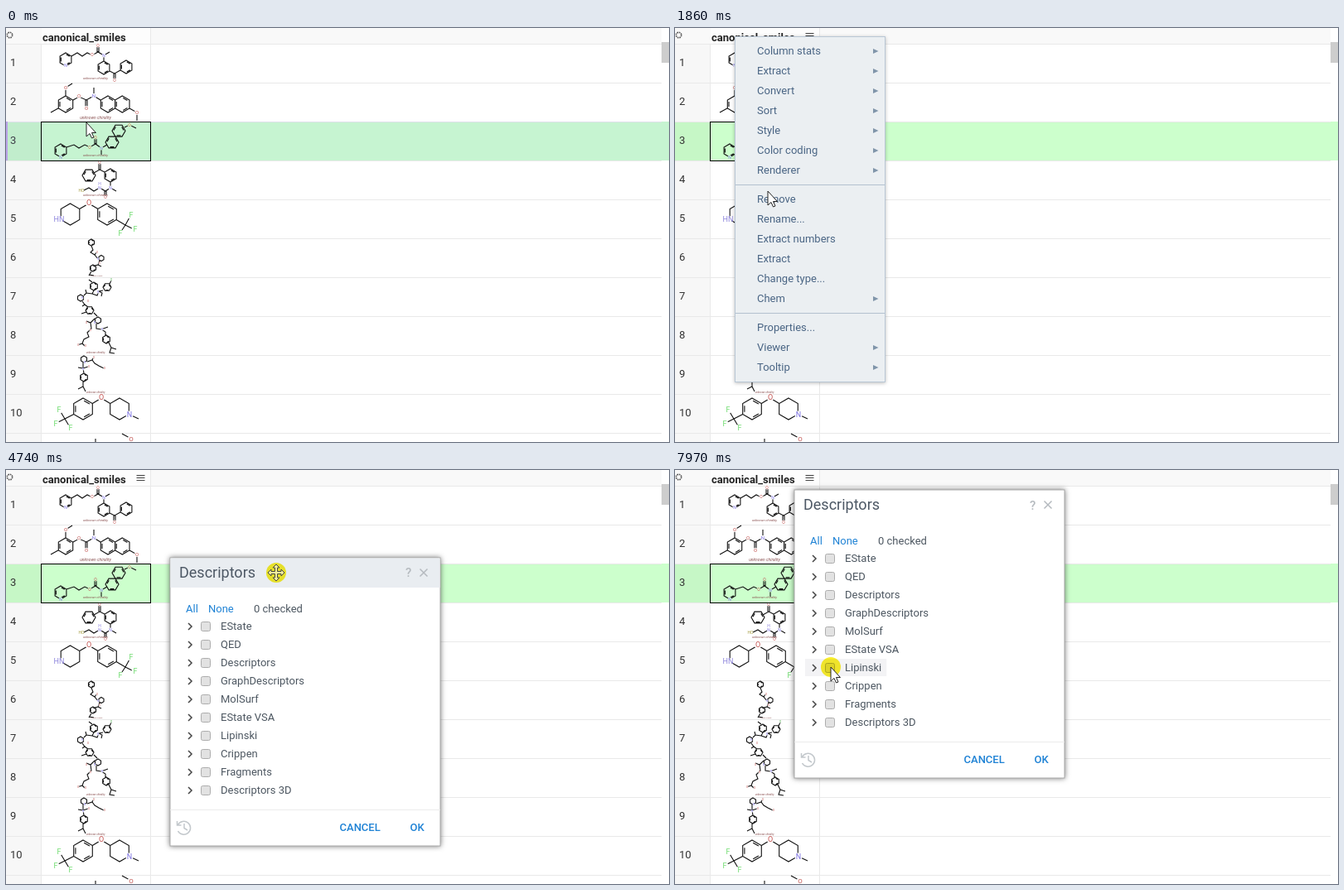
An HTML page for the animation above (8000 ms loop, 800x500 px).

```html
<!DOCTYPE html>
<html lang="en">
<head>
<meta charset="utf-8">
<title>Descriptors</title>
<style>
html, body { margin: 0; width: 100%; height: 100%; overflow: hidden; background: #fff; }
svg { display: block; width: 800px; height: 500px; font: 13px Roboto, sans-serif; }
text { white-space: pre; }
.mono { font: 11px "Noto Sans Mono", monospace; }
.menu { fill: #4a6584; }
.shade { filter: drop-shadow(0 1px 2px #0004); }
</style>
</head>
<body>
<svg id="stage" viewBox="0 0 800 500"></svg>
<script>
const LOOP = 8000;
const range = n => [...Array(n).keys()];
const text = (x, y, s, attr = '') =>
  `<text x="${x}" y="${y}" ${attr}>${s.replace(/&/g, '&amp;').replace(/</g, '&lt;')}</text>`;
const rect = (x, y, w, h, fill, attr = '') =>
  `<rect x="${x}" y="${y}" width="${w}" height="${h}" fill="${fill}" ${attr}/>`;
const path = (d, stroke, width = 1, attr = '') =>
  `<path d="${d}" fill="none" stroke="${stroke}" stroke-width="${width}" ${attr}/>`;
const group = (id, body, attr = '') => `<g id="${id}" ${attr}>${body}</g>`;

// ---- molecules ----
const ATOM = { O: '#c0504d', N: '#7a6fe0', HN: '#8f86dd', H: '#8f86dd', F: '#6fdc6f', Cl: '#4fb04f', HO: '#a39a3c' };

function ring([x, y, r, aromatic = 1, turn = 0]) {
  const at = (k, s) => {
    const a = (turn - 90 + 60 * k) * Math.PI / 180;
    return `${(x + s * Math.cos(a)).toFixed(1)} ${(y + s * Math.sin(a)).toFixed(1)}`;
  };
  let d = 'M' + range(6).map(k => at(k, r)).join('L') + 'Z';
  if (aromatic) for (const k of [0, 2, 4]) d += `M${at(k + .12, r * .76)}L${at(k + .88, r * .76)}`;
  return d;
}

function molecule(rings, bonds, atoms, size = 5, note) {
  const marks = atoms.map(([s, x, y]) =>
    `<circle cx="${x}" cy="${y}" r="${size * .5}" fill="${y > 113 && y < 160 ? '#ccffcc' : '#fff'}"/>` +
    text(x, y + size * .36, s, `font-size="${size}" text-anchor="middle" fill="${ATOM[s]}"`)).join('');
  const label = note ? text(note[0], note[1], 'unknown chirality',
    `font-size="${note[2]}" font-style="italic" text-anchor="middle" fill="#8a5050"`) : '';
  return path(rings.map(ring).join('') + bonds, '#111', 1.1) + marks + label;
}

const molecules = [
  molecule([[72, 38, 8], [118, 48, 8], [145, 47, 8]],
    'M79 34L86 30L92 34L98 30L104 33L111 29L118 33L125 29M110 29V22M112 29V22M118 33V40M125 52L131 55L138 51M130 55V63M132 55V63',
    [['N', 72, 45], ['O', 104, 32], ['O', 111, 21], ['N', 118, 33], ['O', 131, 63]], 5, [108, 62, 4]),
  molecule([[72, 92, 10], [123, 92, 10], [140.3, 92, 10]],
    'M72 82V72L80 67M63 97L54 102M81 87L88 83L97 87L106 82L114 87M96 87V96M98 87V96M106 82V72M149 97L158 102V112',
    [['O', 72, 72], ['O', 88, 82], ['O', 97, 97], ['N', 106, 82], ['O', 158, 102]], 6, [108, 110, 5]),
  molecule([[66, 148, 8], [128, 138, 8, 1, 30], [136, 124.2, 8, 1, 30]],
    'M73 144L82 141L88 145L95 141L101 144L108 140L115 145L122 141M107 140V133M109 140V133M115 145V153M143 120L149 117L157 121',
    [['N', 66, 156], ['O', 101, 144], ['O', 108, 132], ['N', 115, 145], ['O', 149, 117]], 5, [108, 155, 4]),
  molecule([[100, 178, 8, 1, 30], [126, 178, 8]],
    'M106 175L113 171L119 174M112 171V163M114 171V163M126 186V193L133 197M126 193L120 197L113 193L106 197L100 193L94 196M119 197V204M121 197V204',
    [['O', 113, 162], ['N', 126, 193], ['N', 113, 193], ['H', 113, 188], ['O', 120, 204], ['HO', 91, 196]], 5, [108, 203, 4]),
  molecule([[77.5, 225, 13, 0], [122, 225, 13]],
    'M88.7 218.5L100 212L111 218.5M133 231.5L144 238L150 227M144 238L154 243M144 238L138 247',
    [['HN', 64, 231], ['O', 100, 211], ['F', 151, 226], ['F', 156, 243], ['F', 138, 248]], 9),
  molecule([[103, 259, 4], [115, 278, 3.5, 0], [105, 290, 4]],
    'M103 263L105 268L102 271L107 274L111 279M107 274L109 271M113 281L111 286L107 287M111 286L115 288M103 294L100 299M101 298L106 299',
    [['O', 110, 271], ['N', 111, 279], ['O', 113, 284]], 3, [109, 300, 2]),
  molecule([[122, 313, 5, 1, 30], [106, 312, 5], [90, 326, 4, 0], [101, 341, 5, 1, 30]],
    'M117 317L112 318L110 323L104 321L106 317M112 318L116 320L115 324M104 321L97 320L94 323M97 320L96 316M92 330L95 334L99 337M95 334L92 336M97 343L91 345M106 344L110 348M104 307L100 304M125 309L127 305',
    [['Cl', 127, 304], ['N', 111, 319], ['N', 92, 326], ['O', 99, 330]], 3),
  molecule([[111, 353, 4, 0], [121, 376, 5]],
    'M107 351L102 356L97 354M102 356L103 363L98 368L100 373L94 376L92 381L86 383M92 381L95 384M109 357L109 363L115 364L120 367M115 364L123 361M120 367V371M124 380L127 386L133 388M127 386L125 392L131 393',
    [['N', 107, 356], ['O', 97, 356], ['O', 102, 365], ['N', 116, 364], ['O', 87, 383], ['O', 96, 384]], 3, [108, 393, 3]),
  molecule([[94, 400, 4, 0], [94, 422, 5]],
    'M98 403L104 401L107 405L112 408L118 411M104 401L106 397M93 404L93 411L87 410M93 411L99 409M93 411L94 417M93 427L93 433L87 436M93 433L96 439',
    [['O', 106, 398], ['N', 95, 404], ['N', 93, 412], ['O', 100, 409], ['O', 119, 411]], 3, [108, 441, 3]),
  molecule([[93, 460, 13], [137, 460, 13, 0]],
    'M81.7 466.5L71 472L65 462M71 472L61 477M71 472L77 482M104.3 453.5L115 447L125.7 453.5M148.3 466.5L160 472',
    [['F', 64, 461], ['F', 60, 478], ['F', 78, 483], ['O', 115, 446], ['N', 149, 467]], 9),
  molecule([], 'M108 496V500M140 490L151 496', [['O', 151, 496]], 8)
].join('');

// ---- grid ----
function grid() {
  const rows = range(11).map(k => 19.5 + 47 * k);
  return rect(0, 0, 791, 19, '#f9f9f9') + rect(43, 0, 131, 19, '#fdfdfd') + rect(0, 20, 42, 480, '#f7f7f7') +
    rect(0, 113, 800, 47, '#ccffcc') + rect(0, 113, 42, 47, '#000', 'opacity=".03"') +
    path(rows.map(y => `M0 ${y}H791`).join('') + 'M42.5 20V500M174.5 0V500', '#e9e9e9') +
    rect(791, 17, 9, 25, '#cdcdcd') +
    `<circle cx="4.5" cy="8.5" r="3.2" fill="none" stroke="#555" stroke-width="1.6" stroke-dasharray="1.6 .9"/>` +
    range(10).map(k => text(5, 46 + 47 * k, `${k + 1}`, 'fill="#333"')).join('') +
    text(44, 16, 'canonical_smiles', 'font-weight="700" fill="#222"') +
    group('hover', rect(0, 0, 800, 47, '#9696ff', 'opacity=".1"') + rect(0, 0, 2, 47, '#b9a2e8')) +
    molecules + rect(42.5, 113.5, 132, 47, 'none', 'stroke="#000"') +
    group('burger', path('M157.5 6.5h10m-10 3h10m-10 3h10', '#444'));
}

// ---- tooltip ----
const smiles = [
  'COC(=O)[C@]1(C)CCC[C@@]2(C)[C@H]1CC(=O)c3cc(c(NCCN...',
  'Br.Clc1ccccc1N2CCN(CC2)C(=O)C3CCCN(Cc4ccc(Br)cc4)C...',
  'Br.Clc1ccccc1N2CCN(CC2)C(=O)C3CCCN(Cc4ccc(CN5CCCC(...',
  'Br.[O-][N+](=O)c1ccc(CN2CCCC(C2)C(=O)N3CCN(CC3)c4c...',
  'BrC1=C(OCC(=O)NCc2ccccc2)C(=O)OC1c3ccccc3',
  'Brc1cc(Br)c2N=C(N(C(=O)c2c1)c3nc4ccccc4s3)c5ccccc5',
  'Brc1ccc(NC(=O)Nc2nc3c(ccc4ccccc34)s2)cc1',
  'Brc1ccc(NC(=S)Nc2nc3c(ccc4ccccc34)s2)cc1',
  'Brc1ccc(Oc2ccc(\\C=N\\NC(=O)CSc3nc4ccccc4s3)cc2)cc1',
  'Brc1ccc(Oc2ccc(\\C=N\\Nc3nc4ccccc4s3)cc2)cc1'
];

function tooltip() {
  const cell = (x, y, s, fill) => text(x, y, s, `class="mono" text-anchor="end" fill="${fill}"`);
  const small = (y, s, attr = '') => text(99, y, s, `font-size="11.7" fill="#4d4d4d" ${attr}`);
  return rect(89.5, 28.5, 509, 299, '#fbfde1', 'stroke="#e2e4bd" class="shade"') +
    small(50, 'canonical_smiles', 'font-weight="700"') + small(78, '1000 categories') +
    smiles.map((s, k) => {
      const y = 93 + 15 * k;
      return cell(454, y, s, '#222') + cell(499, y, '1', '#222') +
        rect(502, y - 8, 44, 9, '#add8e6') + cell(587.5, y, '0.1%', '#666');
    }).join('') +
    cell(454, 243, '(990 others)', '#4169d8') + cell(499, 243, '990', '#222') + cell(553.5, 243, '99.0%', '#666') +
    small(274, 'quality: Molecule') + small(302, 'cell.renderer: Molecule');
}

// ---- context menu ----
const panel = (x, y, w, h) => rect(x, y, w, h, '#ebeff2', 'stroke="#b9c7d5" class="shade"');

function menu() {
  const blocks = [
    [28, ['Column stats>', 'Extract>', 'Convert>', 'Sort>', 'Style>', 'Color coding>', 'Renderer>']],
    [207, ['Remove', 'Rename...', 'Extract numbers', 'Extract', 'Change type...', 'Chem>']],
    [362, ['Properties...', 'Viewer>', 'Tooltip>']]
  ];
  const items = blocks.flatMap(([top, names]) => names.map((name, k) => {
    const y = top + 24 * k;
    return text(99, y + 4, name.replace('>', ''), 'class="menu"') +
      (name.endsWith('>') ? `<path d="M239 ${y - 3}l6.5 3l-6.5 3z" fill="#8095aa"/>` : '');
  })).join('');
  return panel(72.5, 10.5, 181, 417) + group('chemRow', rect(73, 315, 180, 24, '#d6dee6')) +
    path('M73 189.5H253M73 344.5H253', '#b3c1cf') + items;
}

function submenu() {
  const names = ['Substructure Search...', 'Descriptors...', 'Descriptors (fast)...', 'Find MCS',
    'Get R Groups...', 'Fingerprints...', 'To InChI', 'To InChI Key', 'Map Identifiers...'];
  return panel(252.5, 275.5, 210, 240) + group('descRow', rect(253, 305, 209, 24, '#d6dee6')) +
    names.map((s, k) => text(279, 297 + 24 * k, 'Chem | ' + s, 'class="menu"')).join('');
}

// ---- dialog, drawn relative to its top left corner ----
const groups = ['EState', 'QED', 'Descriptors', 'GraphDescriptors', 'MolSurf', 'EState VSA',
  'Lipinski', 'Crippen', 'Fragments', 'Descriptors 3D'];
const lipinski = ['FractionCSP3', 'HeavyAtomCount', 'NHOHCount', 'NOCount', 'NumAliphaticCarbocycles',
  'NumAliphaticHeterocycles', 'NumAliphaticRings', 'NumAromaticCarbocycles', 'NumAromaticHeterocycles',
  'NumAromaticRings', 'NumHAcceptors', 'NumHDonors'];

function treeRow(x, y, name, arrow) {
  const d = arrow === 'down' ? `M${x - 17} ${y - 2}l4 4l4 -4` : `M${x - 15} ${y - 4}l4 4l-4 4`;
  return (arrow ? path(d, '#444', 1.5) : '') +
    rect(x + .5, y - 5.5, 11, 11, '#e2e2e2', 'rx="2" stroke="#adadad"') +
    text(x + 24, y + 4, name, 'fill="#4d5761"');
}

function tree(open) {
  const names = open ? groups.slice(0, 7) : groups;
  let out = names.map((s, k) => treeRow(37, 83 + 22 * k, s, open && k === 6 ? 'down' : 'right')).join('');
  if (open) return out + lipinski.map((s, k) => treeRow(55, 237 + 22 * k, s)).join('');
  const blue = 'font-weight="500" fill="#2083d5"';
  return out + path('M0 304.5H326', '#ececec') + text(204.5, 330, 'CANCEL', blue) + text(289.5, 330, 'OK', blue) +
    path('M9.5 322.5A8 8 0 1 1 9.5 330M8.5 318v5h5M17 321v5.500l4 2.500', '#c3c8cc', 1.5);
}

function dialog() {
  const frame = h => rect(0, 0, 326, h, '#fff', 'stroke="#a9a9a9" style="filter:drop-shadow(0 0 3px #0008)"');
  return group('frame', frame(348)) + group('tallFrame', frame(520)) +
    group('titleBar', rect(.5, .5, 325, 35.500, '#e9edf1')) +
    text(11, 24, 'Descriptors', 'font-size="18" fill="#4d5865"') +
    text(284, 23.5, '?', 'font-size="15" font-weight="500" fill="#b5babf"') +
    path('M301.500 13.500l9 9m0 -9l-9 9', '#b5babf', 1.5) +
    text(19, 66, 'All', 'fill="#2083d5"') + text(46, 66, 'None', 'fill="#2083d5"') +
    text(101, 66, '0 checked', 'fill="#4d5761"') +
    rect(13, 0, 98, 21, '#f3f3f5', 'id="rowHover"') +
    group('closedTree', tree(false)) + group('openTree', tree(true));
}

const stage = document.getElementById('stage');
stage.innerHTML = grid() + group('tooltip', tooltip()) + group('menu', menu()) + group('submenu', submenu()) +
  group('dialog', dialog()) +
  group('click', '<circle r="12" fill="#fbf02c"/>', 'style="mix-blend-mode:multiply"') +
  group('arrow', '<path d="M0 0V17L4 13.500L6.500 19L9 18L6.500 12.500H11.500Z" fill="#fff" stroke="#222"/>') +
  group('mover', '<path d="M0-10L4-6H1.500V-1.500H6V-4L10 0L6 4V1.500H1.500V6H4L0 10L-4 6H-1.500V1.500H-6V4L-10 0L-6-4V-1.500H-1.500V-6H-4Z" fill="#fff8" stroke="#444"/>');

const $ = id => document.getElementById(id);
const show = (id, on) => { $(id).style.display = on ? '' : 'none'; };
const move = (id, x, y) => $(id).setAttribute('transform', `translate(${x} ${y})`);
const rowWidths = groups.map(s => {
  const label = [...$('closedTree').querySelectorAll('text')].find(e => e.textContent === s);
  return label.getComputedTextLength() + 54;
});

// ---- timeline ----
const track = [[150, 97, 114], [800, 80, 11], [1560, 80, 11], [1860, 112, 197], [2320, 127, 333], [2880, 127, 333],
  [2960, 245, 326], [3420, 330, 319], [4030, 330, 319], [4570, 326, 124], [4740, 326, 124], [5190, 272, 42],
  [5370, 272, 42], [6030, 192, 245], [6180, 192, 245], [6410, 167, 238], [7680, 167, 238], [7970, 188, 238]];
const clicks = [[1010, 1160], [3570, 3650], [4740, 5190], [6410, 6730], [7300, 7510], [7970, 8000]];
const within = (t, a, b) => t >= a && t < b;

function pointer(t) {
  const k = track.findIndex(p => p[0] > t);
  if (k < 0) return track[track.length - 1].slice(1);
  if (k === 0) return track[0].slice(1);
  const [a, x, y] = track[k - 1], [b, u, v] = track[k];
  const p = (t - a) / (b - a), e = p * p * (3 - 2 * p);
  return [x + (u - x) * e, y + (v - y) * e];
}

function render(t) {
  const [x, y] = pointer(t);
  const row = Math.floor((y - 19) / 47);
  show('hover', t < 840 && row >= 0);
  move('hover', 0, 19 + 47 * row);
  show('burger', t > 840 || y < 20);
  show('tooltip', within(t, 840, 1160));
  show('menu', within(t, 1160, 3650));
  show('chemRow', t >= 2400);
  show('submenu', within(t, 2400, 3650));
  show('descRow', t > 2960 && x > 253);

  const drag = t < 4740 ? 0 : (326 - Math.max(272, pointer(Math.min(t, 5190))[0])) / 54;
  const left = 198 - 54 * drag, top = 106 - 82 * drag;
  const open = within(t, 6610, 7400);
  const onTitle = within(t, 4030, 5800) && y >= top && y < top + 36;
  const item = Math.floor((y - top - 72) / 22);
  const hot = t > 5370 && item >= 0 && item < 10 && x - left < rowWidths[item] + 13;
  show('dialog', t >= 3730);
  move('dialog', left, top);
  show('frame', !open);
  show('tallFrame', open);
  show('closedTree', !open);
  show('openTree', open);
  show('titleBar', onTitle);
  show('rowHover', hot);
  if (hot) {
    $('rowHover').setAttribute('y', 72 + 22 * item);
    $('rowHover').setAttribute('width', rowWidths[item]);
  }

  show('click', clicks.some(([a, b]) => within(t, a, b)));
  show('arrow', !onTitle);
  show('mover', onTitle);
  for (const id of ['click', 'arrow', 'mover']) move(id, x, y);
}

const start = performance.now();
function tick() {
  render((performance.now() - start) % LOOP);
  requestAnimationFrame(tick);
}
tick();
</script>
</body>
</html>
```
